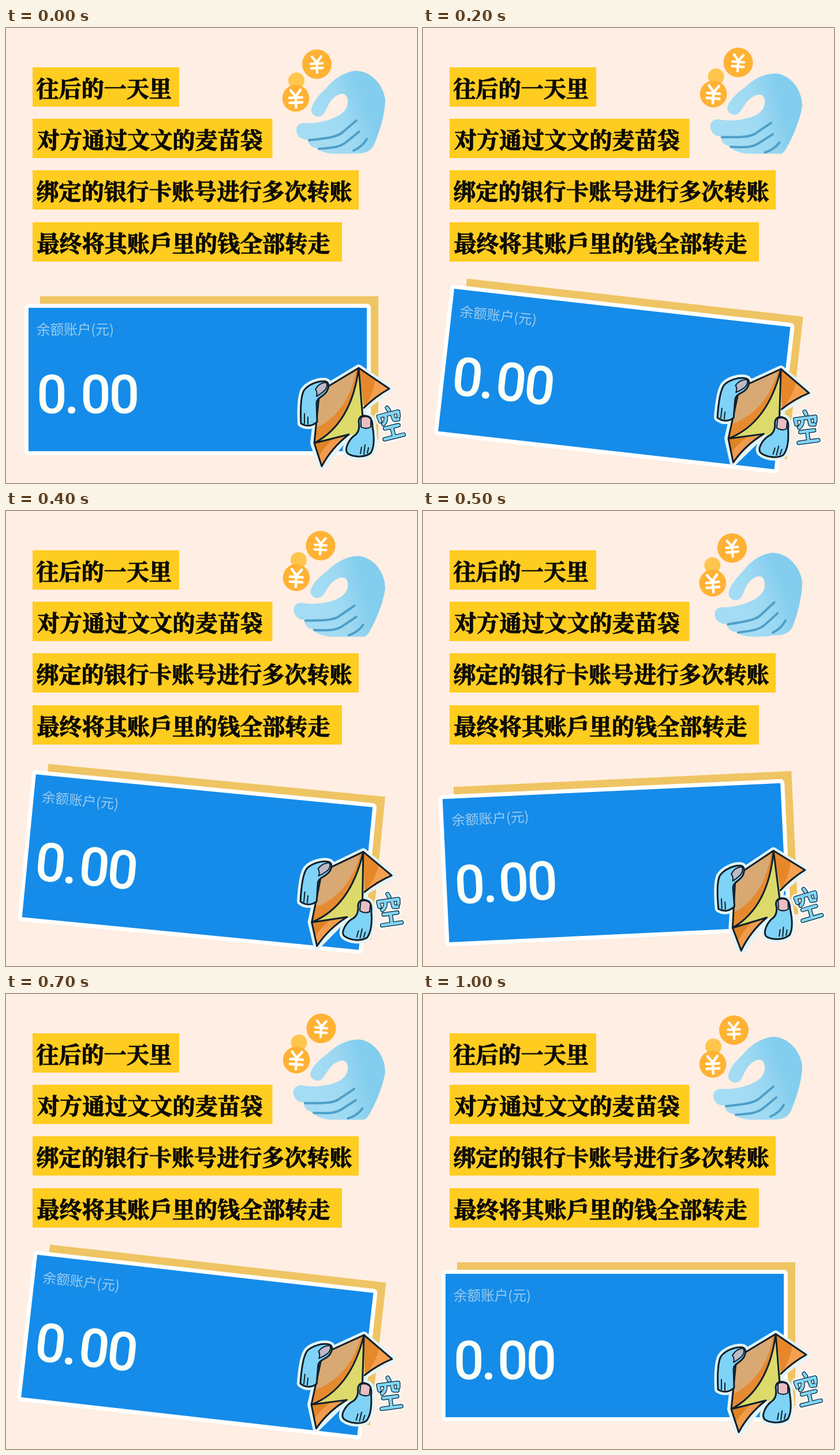
Animation of 712x787 px, one loop 1.9 s. Source, as an HTML page with a canvas:

```html
<!DOCTYPE html>
<html lang="zh-CN">
<head>
<meta charset="utf-8">
<title>余额</title>
<style>
  html, body { margin: 0; width: 100%; height: 100%; overflow: hidden; background: #ffeee3; }
  canvas { display: block; }
</style>
</head>
<body>
<canvas id="stage" width="712" height="787"></canvas>
<script>
const ctx = document.getElementById('stage').getContext('2d');
const LOOP = 1900, STEP = 100;
// Held tilt in degrees for each step; the rest of the loop stands still.
const TILTS = [0, -4, 6.45, -5.15, 5.55, -2.7, -1.18, 6.45];
const SERIF = '"Noto Serif CJK SC", "Noto Sans CJK SC", "Noto Sans CJK", serif';
const SANS = '"Noto Sans CJK SC", "Noto Sans CJK", sans-serif';
const INK = '#10202c', SKIN = '#7fd3f7';

const LINES = [
  ['往后的一天里', 52.5, 68, 254],
  ['对方通过文文的麦苗袋', 54, 157, 415.5],
  ['绑定的银行卡账号进行多次转账', 52.5, 246, 565],
  ['最终将其账戶里的钱全部转走', 53.5, 336, 536]
];

function fill(path, color) {
  ctx.fillStyle = color;
  ctx.fill(new Path2D(path));
}

function stroke(path, color, width) {
  ctx.strokeStyle = color;
  ctx.lineWidth = width;
  ctx.stroke(new Path2D(path));
}

function disc(x, y, r, color) {
  ctx.fillStyle = color;
  ctx.beginPath();
  ctx.arc(x, y, r, 0, Math.PI * 2);
  ctx.fill();
}

function rect(x, y, w, h, color, r = 0) {
  ctx.fillStyle = color;
  ctx.beginPath();
  ctx.roundRect(x, y, w, h, r);
  ctx.fill();
}

function text(str, x, y, font, color, weight = 0) {
  ctx.font = font;
  ctx.fillStyle = ctx.strokeStyle = color;
  ctx.fillText(str, x, y);
  if (weight) {
    ctx.lineWidth = weight;
    ctx.strokeText(str, x, y);
  }
}

function tilted(cx, cy, degrees, draw) {
  ctx.save();
  ctx.translate(cx, cy);
  ctx.rotate(degrees * Math.PI / 180);
  ctx.translate(-cx, -cy);
  draw();
  ctx.restore();
}

function drawLines() {
  for (const [str, x, y, w] of LINES) {
    rect(46, y, w, 68, '#ffcc20');
    text(str, x, y + 50.5, '900 39.1px ' + SERIF, '#0c0a05', 1.1);
  }
}

function drawCoin(x, y, r, scale) {
  disc(x, y, r, '#ffb234');
  ctx.save();
  ctx.translate(x, y);
  ctx.rotate(-.04);
  ctx.scale(scale, scale);
  stroke('M-8 -13 L0 -3 L8 -13 M-10 -1 H10 M-10 7 H10 M0 -3 V15', '#fff', 4.2);
  ctx.restore();
}

function drawHand() {
  disc(503, 91, 14, '#ffc64d');
  drawCoin(538.5, 62.5, 25.5, 1);
  drawCoin(502, 121.5, 23.3, 1.08);

  const shade = ctx.createLinearGradient(545, 155, 622, 125);
  shade.addColorStop(0, '#a4dcf4');
  shade.addColorStop(.45, '#9dd9f2');
  shade.addColorStop(1, '#83cdee');
  fill('M529 145 C527 134 541 116 554 105 C567 89 586 75 608 74 C638 76 656 105 657 126 ' +
       'C656 154 645 184 638 201 C632 214 622 218 603 217 C584 219 560 220 544 212 ' +
       'C541 209 538 208 535 207 C528 206 523 199 523 193 C513 194 505 188 503 179 ' +
       'C502 170 507 165 515 164 C538 166 561 160 577 151 C588 144 593 136 592 124 ' +
       'C590 112 581 111 571 118 C558 127 556 142 549 150 C542 156 533 153 529 145 Z', shade);
  stroke('M525 194 C555 191 571 189 581 182 L607 160 M542 209 C564 207 578 207 590 197 ' +
         'L612 179 M602 212 C614 207 620 201 625 192', '#4e9fc7', 4);
}

// The hand and coins sit in a fixed frame that cuts the wrist as they sway.
function drawFramedHand(tilt) {
  ctx.save();
  ctx.beginPath();
  ctx.rect(478, 33, 179, 184.5);
  ctx.clip();
  tilted(568, 128, tilt, drawHand);
  ctx.restore();
}

function drawCard() {
  rect(59, 464, 586, 248, '#efc463');
  rect(32, 477, 600, 262, '#fff', 7);
  rect(39, 484, 586, 248, '#158ce9');
  text('余额账户(元)', 53, 530, '400 23.6px ' + SANS, '#9bcbed');
  const digits = [['0', 53], ['.', 101], ['0', 129], ['0', 178.5]];
  for (const [glyph, x] of digits) {
    text(glyph, x, 666, '500 93px Roboto, sans-serif', '#fafff8');
  }
}

const ENVELOPE = 'M611 588 L664 624 L620 657 L616 690 L592 703 L547 758 L533 718 L543 629 Z';
const FINGER = 'M511 684 C510 662 510 638 516 627 C523 617 540 610 552 611 ' +
               'C560 612 560 620 556 628 C550 638 540 638 538 648 L539 681 C531 689 520 690 511 684 Z';
const THUMB = 'M611 681 C611 673 617 669 624 671 C632 672 635 679 635 690 ' +
              'C638 707 638 725 632 735 C622 743 603 743 592 736 C585 729 594 713 602 706 ' +
              'C611 701 613 692 611 681 Z';
const SIGN = 'M0 -29 L2 -24 M-17 -9 L-18 -18 H17 L16 -10 M-6 -14 Q-7 -6 -13 -3 ' +
             'M6 -14 L7 -6 L14 -5 M-12 5 H12 M0 5 V23 M-17 23 H17';

function drawSign() {
  ctx.save();
  ctx.translate(667, 685);
  ctx.rotate(-.24);
  [['#f2fafa', 14], [INK, 7.5], ['#80d5f6', 5]].forEach(([color, width]) => stroke(SIGN, color, width));
  ctx.restore();
}

function drawEnvelope() {
  // Right flap, open pocket, left face and bottom flap.
  fill('M611 588 L664 624 L620 657 Z', '#f5a050');
  fill('M611 588 L640 608 Q636 635 620 657 Z', '#e6872a');
  fill('M611 588 L620 657 L616 700 L534 718 C578 695 603 650 611 588 Z', '#dcda6b');
  fill('M611 588 C603 650 578 695 534 718 L543 629 Z', '#e68a31');
  fill('M606 594 C597 643 572 674 539 691 L543 629 Z', '#d9a974');
  fill('M534 718 L592 703 Q564 726 547 758 Z', '#f19b4d');
  fill('M534 718 L567 710 Q548 729 542 742 Z', '#df8424');
  stroke('M611 588 L664 624 Q640 637 620 657 M611 588 L618 675 M611 588 C603 650 578 695 534 718 ' +
         'L543 629 Z M534 718 L594 703 Q564 726 547 758 Z', INK, 3);
}

function drawSticker() {
  [ENVELOPE, FINGER, THUMB].forEach(path => stroke(path, '#e3f4f6', 12));
  drawSign();
  drawEnvelope();
  for (const part of [FINGER, THUMB]) {
    fill(part, SKIN);
    stroke(part, INK, 3);
  }
  const nails = [
    ['M536 625 Q543 613 555 613 Q558 620 552 627 Q544 634 538 637 Q540 630 536 625 Z', '#bdb9c6'],
    ['M615 674 Q624 669 632 676 L632 690 Q624 695 615 690 Z', '#e9bec5']
  ];
  for (const [nail, color] of nails) {
    fill(nail, color);
    stroke(nail, INK, 2);
  }
  stroke('M517 667 V684 M523 673 V685 M616 725 L614 736 M622 721 L620 737 M628 726 L626 735', INK, 2);
}

function render(now) {
  const tilt = TILTS[Math.floor(now % LOOP / STEP)] || 0;
  ctx.lineCap = ctx.lineJoin = 'round';
  rect(0, 0, 712, 787, '#ffeee3');
  drawLines();
  drawFramedHand(tilt);
  tilted(338.5, 601.5, tilt, drawCard);
  tilted(600, 670, tilt, drawSticker);
}

const start = performance.now();
function frame() {
  render(performance.now() - start);
  requestAnimationFrame(frame);
}
frame();
</script>
</body>
</html>
```
